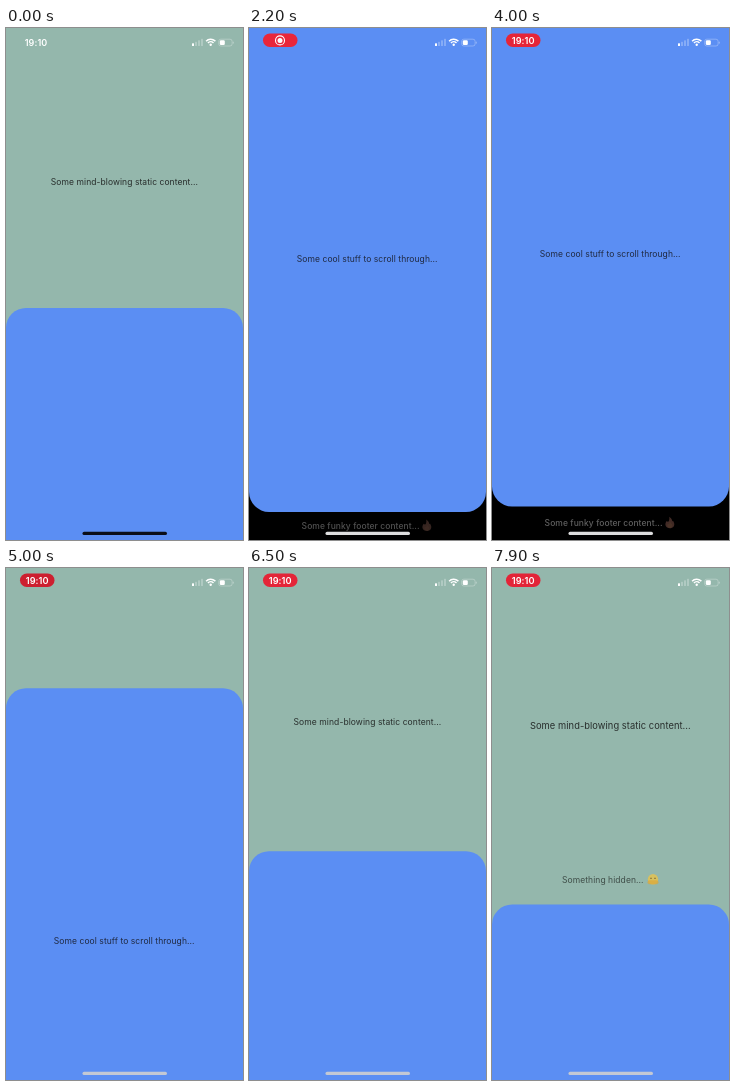
An HTML page with a canvas for the animation above (8000 ms loop, 237 by 512 pixels).

```html
<!DOCTYPE html>
<html lang="en">
<head>
<meta charset="utf-8">
<title>Scrolling sheet</title>
<style>
html, body { margin: 0; width: 100%; height: 100%; overflow: hidden; background: #94b7ac; }
canvas { display: block; width: 237px; height: 512px; }
</style>
</head>
<body>
<canvas id="stage"></canvas>
<script>
const W = 237, H = 512, LOOP = 8000;
const REST = 280, SHEET_H = 505;
const canvas = document.getElementById('stage');
const ratio = window.devicePixelRatio || 1;
canvas.width = W * ratio;
canvas.height = H * ratio;
const c = canvas.getContext('2d');

// [time, top edge of the sheet]
const keys = [
  [0, 280], [250, 277], [700, 185], [1300, 51], [1700, 22], [2050, -4],
  [2500, -58], [2900, -84], [3200, -84], [3600, -62], [4000, -27],
  [4400, -9], [4700, 22], [5000, 120], [5400, 268], [5700, 298.3],
  [6300, 283], [6700, 284], [7200, 312.5], [7900, 336.5], [8000, 338]
];

function slope(i) {
  if (i <= 0 || i >= keys.length - 1) return 0;
  const [a, b, d] = [keys[i - 1], keys[i], keys[i + 1]];
  const left = (b[1] - a[1]) / (b[0] - a[0]);
  const right = (d[1] - b[1]) / (d[0] - b[0]);
  return left * right <= 0 ? 0 : 2 * left * right / (left + right);
}

function sheetTop(t) {
  let i = 0;
  while (i < keys.length - 2 && keys[i + 1][0] <= t) i++;
  const [t0, y0] = keys[i], [t1, y1] = keys[i + 1];
  const span = t1 - t0, u = (t - t0) / span, v = 1 - u;
  return y0 * (1 + 2 * u) * v * v + slope(i) * span * u * v * v
    + y1 * u * u * (3 - 2 * u) - slope(i + 1) * span * u * u * v;
}

function box(x, y, w, h, r, color) {
  c.fillStyle = color;
  c.beginPath();
  c.roundRect(x, y, w, h, r);
  c.fill();
}

function disc(x, y, r, color) {
  c.fillStyle = color;
  c.beginPath();
  c.arc(x, y, r, 0, 7);
  c.fill();
}

function text(str, x, y, color, { size = 8.5, weight = 400, align = 'left' } = {}) {
  c.font = `${weight} ${size}px Inter, sans-serif`;
  c.letterSpacing = `${size * 0.008}px`;
  c.textAlign = align;
  c.textBaseline = 'alphabetic';
  c.fillStyle = color;
  c.fillText(str, x, y + size * 0.37);
}

function flame(x, y, s, color) {
  c.fillStyle = color;
  c.beginPath();
  c.moveTo(x - s * 0.1, y - s * 1.2);
  c.bezierCurveTo(x + s * 0.7, y - s * 0.6, x + s * 0.3, y - s * 0.2, x + s * 0.65, y - s * 0.4);
  c.bezierCurveTo(x + s * 1.2, y + s * 0.5, x + s * 0.6, y + s, x, y + s);
  c.bezierCurveTo(x - s * 0.8, y + s, x - s * 1.1, y + s * 0.2, x - s * 0.6, y - s * 0.4);
  c.bezierCurveTo(x - s * 0.3, y, x, y - s * 0.4, x - s * 0.1, y - s * 1.2);
  c.fill();
}

function hiddenFace(x, y) {
  disc(x, y, 5.2, '#f3c43f');
  box(x - 3, y - 1.5, 2, 0.9, 0.4, '#5d421c');
  box(x + 1, y - 1.5, 2, 0.9, 0.4, '#5d421c');
  box(x - 5.5, y + 1, 11, 4, 2, '#dca63a');
}

function statusBar(t) {
  if (t < 500) {
    text('19:10', 30, 14.5, '#fff', { size: 9, weight: 600, align: 'center' });
  } else {
    const glow = 0.5 - 0.5 * Math.cos((t - 1300) / 1970 * 2 * Math.PI);
    box(14, 5.5, 34.5, 13.5, 6.75,
      `rgb(${200 + 34 * glow}, ${30 + 8 * glow}, ${46 + 12 * glow})`);
    if (t < 3600) {
      disc(31, 12.4, 2.5, '#fff');
      c.strokeStyle = '#fff';
      c.lineWidth = 1.1;
      c.beginPath();
      c.arc(31, 12.4, 4.5, 0, 7);
      c.stroke();
    } else {
      text('19:10', 31.2, 12.4, '#fff', { size: 9.2, weight: 600, align: 'center' });
    }
  }

  for (let i = 0; i < 4; i++) {
    const h = 2.7 + i * 1.5;
    box(186 + i * 3, 18 - h, 2, h, 0.5, i ? '#ffffff44' : '#fff');
  }

  c.strokeStyle = '#fff';
  c.lineWidth = 1.5;
  for (const r of [3.8, 6.3]) {
    c.beginPath();
    c.arc(204.7, 17.5, r, -Math.PI * 0.76, -Math.PI * 0.24);
    c.stroke();
  }
  disc(204.7, 16.8, 1.2, '#fff');

  c.strokeStyle = '#ffffff66';
  c.lineWidth = 0.7;
  c.beginPath();
  c.roundRect(212.7, 11.2, 13.4, 6.8, 2.1);
  c.stroke();
  box(213.8, 12.2, 5, 4.8, 1.2, '#fff');
  box(226.8, 13.5, 0.9, 2.2, 0.5, '#ffffff66');
}

function draw(t) {
  const top = sheetTop(t), bottom = top + SHEET_H;
  const pull = Math.max(0, top - REST);
  const gap = Math.max(0, H - bottom);

  c.setTransform(ratio, 0, 0, ratio, 0, 0);
  box(0, 0, W, H, 0, '#94b7ac');
  text('Some mind-blowing static content...', 118.4, 154 + pull * 0.07, '#282e2c',
    { size: 8.5 * (1 + pull / 600), align: 'center' });

  if (pull) {
    c.globalAlpha = Math.min(1, 0.3 + pull / 140);
    const y = 304.2 + pull * 0.13;
    text('Something hidden...', 70, y, '#1c2220');
    hiddenFace(161, y - 0.3);
    c.globalAlpha = 1;
  }

  // footer lies behind the lower half of the sheet
  box(0, top + 250, W, H + 200, 0, '#000');
  if (gap) {
    const shown = Math.min(1, gap / 91), y = H - gap / 2;
    const green = 130 - 47 * shown, blue = 130 - 87 * shown;
    c.globalAlpha = shown;
    text('Some funky footer content...', 52.6, y, '#fff', { weight: 500 });
    flame(177.8, y, 5.2, `rgb(${140 + 93 * shown}, ${green}, ${blue})`);
    flame(177.8, y + 2, 3, `rgb(255, 207, 82, ${shown * shown})`);
    c.globalAlpha = 1;
  }

  box(0, top, W, SHEET_H + 0.4, 20, '#5b8ef3');
  text('Some cool stuff to scroll through...', 118.2, top + 252.6, '#202a42', { align: 'center' });

  statusBar(t);
  const bar = t < 2050 ? '#0b0e18' : gap > 60 ? '#a9a9ab' : gap ? '#dededf' : '#c3c8d4';
  box(76.5, 503.8, 84.5, 3.2, 1.6, bar);
}

function tick() {
  draw(performance.now() % LOOP);
  requestAnimationFrame(tick);
}
tick();
</script>
</body>
</html>
```
